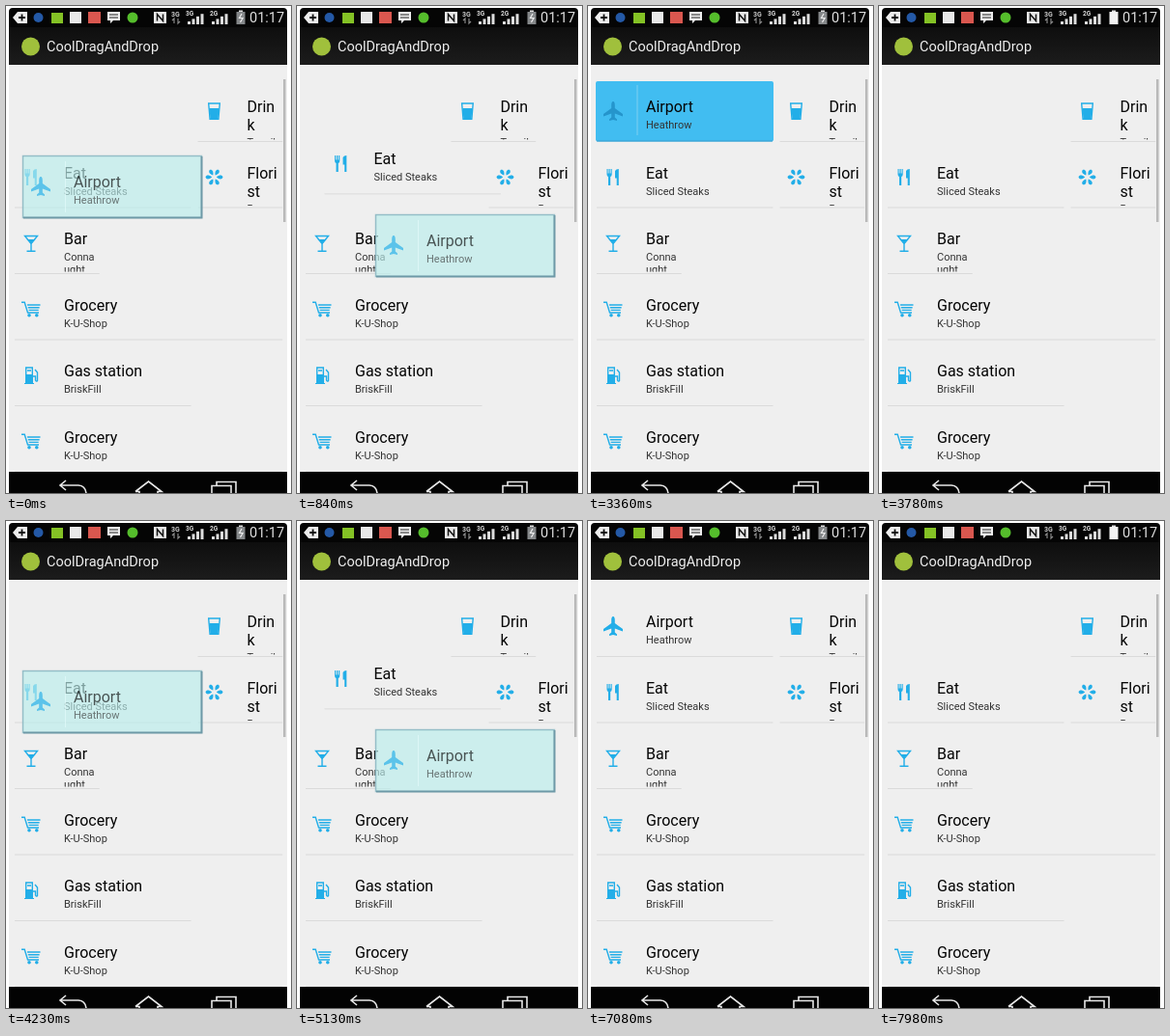
These frames come from a looping animation (295x505 px, 8000 ms). An HTML page with a canvas:

```html
<!DOCTYPE html>
<html lang="en">
<head>
<meta charset="utf-8">
<style>
  html, body { margin: 0; width: 100%; height: 100%; overflow: hidden; background: #fff; }
  canvas { display: block; }
</style>
</head>
<body>
<canvas width="295" height="505"></canvas>
<script>
const ctx = document.querySelector('canvas').getContext('2d');
const LOOP = 8000, TAKE = 4260, TAKE_START = 1470, STEP = 90;
const BLUE = '#22aee8', ROW = 68.5, COL = 94.75;

// Icons are centred on 0,0; "line" parts are stroked, the rest filled.
const icons = {
  plane: { fill: 'M0-10C1.4-10 1.8-8 1.8-6V-3L10 3V5.4L1.8 2.6V6.5L4 8.4V10L0 9L-4 10V8.4L-1.8 6.5V2.6L-10 5.4V3L-1.8-3V-6C-1.8-8-1.4-10 0-10Z' },
  fork: { fill: 'M-6.5-8.5H-5.4V-4H-4.5V-8.5H-3.3V-4H-2.4V-8.5H-1.3V-3Q-1.3-1-2.8-.5V8.5H-5V-.5Q-6.5-1-6.5-3ZM2-6.5Q3-8.5 5.8-8.5V8.5H3.7V1H2Z' },
  glass: { fill: 'M-4.5-4H4.5L0 1Z', line: 'M-6.5-7.5H6.5L0 .5ZM0 0V8M-4.5 8.2H4.5' },
  cart: { fill: 'M-3.8 6.3a1.8 1.8 0 1 0 3.6 0a1.8 1.8 0 1 0-3.6 0M4 6.3a1.8 1.8 0 1 0 3.6 0a1.8 1.8 0 1 0-3.6 0', line: 'M-10-7.3H-6.8L-3.5 3.5H8M-4-4.5H9.5M-3.2-1.8H8.6M-2.4 .9H7.7' },
  pump: { fill: 'M-6-1H2V8H3V9H-7V8H-6Z', line: 'M-5.3 0V-8H1.3V0M2 1H4.5V5Q5.3 7 6.5 5.5V-3L4-6M-4-5H0' },
  cup: { fill: 'M-5-3H5L4 8.5H-4Z', line: 'M-5.8-8H5.8L4.4 8.3H-4.4Z' },
  flower: { fill: Array.from({ length: 6 }, (_, i) => {
    const point = (r, turn) => {
      const a = (i + turn) * Math.PI / 3;
      return `${(r * Math.cos(a)).toFixed(2)} ${(r * Math.sin(a)).toFixed(2)}`;
    };
    return `M${point(2.3, 0)}C${point(6, -.42)} ${point(8.5, -.3)} ${point(9, 0)}C${point(8.5, .3)} ${point(6, .42)} ${point(2.3, 0)}Z`;
  }).join('') }
};
for (const icon of Object.values(icons))
  for (const part in icon) icon[part] = new Path2D(icon[part]);

const airport = { icon: 'plane', title: ['Airport'], sub: ['Heathrow'], span: 2 };
const cells = [
  { icon: 'cup', title: ['Drin', 'k'], sub: ['Tequila'], span: 1, at: [2, 0], to: [0, 0] },
  { icon: 'fork', title: ['Eat'], sub: ['Sliced Steaks'], span: 2, at: [0, 1], to: [1, 0] },
  { icon: 'flower', title: ['Flori', 'st'], sub: ['Roses'], span: 1, at: [2, 1] },
  { icon: 'glass', title: ['Bar'], sub: ['Conna', 'ught'], span: 1, at: [0, 2] },
  { icon: 'cart', title: ['Grocery'], sub: ['K-U-Shop'], span: 3, at: [0, 3] },
  { icon: 'pump', title: ['Gas station'], sub: ['BriskFill'], span: 2, at: [0, 4] },
  { icon: 'cart', title: ['Grocery'], sub: ['K-U-Shop'], span: 3, at: [0, 5] }
];

const clamp = v => Math.min(1, Math.max(0, v));
const progress = (p, from, to) => clamp((p - from) / (to - from));
const ease = v => (1 - Math.cos(Math.PI * v)) / 2;
const mix = (a, b, k) => a + (b - a) * k;

function rect(x, y, w, h, color) {
  ctx.fillStyle = color;
  ctx.fillRect(x, y, w, h);
}
function text(str, x, y, size, color, weight = 400) {
  ctx.font = `${weight} ${size}px Roboto, sans-serif`;
  ctx.fillStyle = color;
  ctx.fillText(str, x, y);
}
function stroke(d, color, width) {
  ctx.strokeStyle = color;
  ctx.lineWidth = width;
  ctx.stroke(typeof d === 'string' ? new Path2D(d) : d);
}
function disc(x, y, r, color) {
  ctx.fillStyle = color;
  ctx.beginPath();
  ctx.arc(x, y, r, 0, 7);
  ctx.fill();
}

function drawIcon(name, x, y, color) {
  const { fill, line } = icons[name];
  ctx.save();
  ctx.translate(x, y);
  ctx.fillStyle = color;
  ctx.fill(fill);
  if (line) stroke(line, color, 1.4);
  ctx.restore();
}

function drawContent(cell, x, y, iconColor = BLUE) {
  const w = cell.span * COL - 4;
  ctx.save();
  ctx.beginPath();
  ctx.rect(x, y, w, 60.5);
  ctx.clip();
  drawIcon(cell.icon, x + 18, y + 31, iconColor);
  cell.title.forEach((s, i) => text(s, x + 52, y + 32 + 19 * i, 16, '#050505'));
  const subTop = cell.title.length > 1 ? 67 : 49;
  cell.sub.forEach((s, i) => text(s, x + 52, y + subTop + 13 * i, 11, '#333'));
  ctx.restore();
}

function drawCell(cell, x, y) {
  drawContent(cell, x, y);
  rect(x + 1, y + 62, cell.span * COL - 7, 1, '#dadada');
}

function drawAirport(p) {
  if (p > 2200) return;
  const pressed = p >= 1590;
  ctx.globalAlpha = 1 - progress(p, 1980, 2200);
  if (pressed) {
    ctx.fillStyle = p < 1800 ? '#6ccbf2' : '#41bdf1';
    ctx.beginPath();
    ctx.roundRect(8, 78, 184, 62.5, 2);
    ctx.fill();
    rect(9, 139.5, 182, 1, '#3a9ccb');
    rect(50.5, 82, 1, 52, '#7fd0f2');
    drawContent(airport, 8, 78, '#2595cc');
  } else drawCell(airport, 8, 78);
  ctx.globalAlpha = 1;
}

function drawShadow(p) {
  if (p < 2400) return;
  const lift = ease(progress(p, 2400, 2730)), drag = progress(p, 2850, 3630), rest = progress(p, 3720, 3900);
  const x = Math.round(mix(10, 18, lift) + 64 * drag + 4 * rest);
  const y = Math.round(mix(88, 156, lift) + 61 * drag + 4 * rest);
  ctx.globalAlpha = .66;
  rect(x - 1, y - 1, 186, 65, '#bbefed');
  rect(x + 43, y + 5, 1, 53, '#e4fafa');
  drawContent(airport, x, y);
  ctx.globalAlpha = .8;
  ctx.strokeStyle = '#86b2be';
  ctx.lineWidth = 1.5;
  ctx.strokeRect(x - .5, y - .5, 185, 64);
  stroke(`M${x} ${y + 63.5}H${x + 184.5}V${y}`, '#64909f', 2);
  ctx.globalAlpha = 1;
}

function signal(x, label) {
  text(label, x, 10, 6.5, '#ddd', 700);
  for (let i = 0; i < 4; i++) rect(x + i * 4.5 + 2, 16 - i * 2.6, 3, 3 + i * 2.6, '#ddd');
}

function drawStatusBar(p) {
  ctx.fillStyle = '#050505';
  ctx.beginPath();
  ctx.roundRect(3, 2, 288, 20, [4, 4, 0, 0]);
  ctx.fill();
  ctx.fillStyle = '#eee';
  ctx.fill(new Path2D('M7 12L12 6H22V18H12Z'));
  stroke('M16.5 8.5V15.5M13 12H20', '#111', 1.8);
  disc(33.5, 12, 5, '#2459a6');
  rect(47, 7, 12, 11, '#84c225');
  rect(66, 6, 12, 12, '#e8e8e8');
  rect(85, 6, 13, 12, '#d9574f');
  ctx.fillStyle = '#eee';
  ctx.fill(new Path2D('M105 6H118V15H111L108 18V15H105Z'));
  stroke('M107 9H116M107 12H116', '#222', 1);
  disc(131, 12, 5.5, '#55bd2c');
  rect(153, 6, 13, 12, '#e8e8e8');
  stroke('M156.5 15.5V8.5L162.5 15.5V8.5', '#111', 1.5);
  text('3G', 171, 11, 7, '#ccc', 700);
  stroke('M174 18V13L172 15M178 13V18L180 16', '#888', 1.2);
  signal(186, '3G');
  signal(211, '2G');
  const full = p < 1170 || (p > 2070 && p < 2700);
  rect(241, 4.5, 4, 2, '#ddd');
  rect(238.5, 6, 9, 13, full ? '#f2f2f2' : '#85888a');
  if (!full) stroke('M244 8L241.5 12.5H245L242.5 17', '#eee', 1.2);
  text('01:17', 252, 17, 14.5, '#dedede');
}

function drawHeader() {
  const shade = ctx.createLinearGradient(0, 22, 0, 61);
  shade.addColorStop(0, '#0e0e0e');
  shade.addColorStop(1, '#1c1c1c');
  rect(3, 22, 288, 39, shade);
  disc(25.5, 42, 9.5, '#a0c03c');
  text('CoolDragAndDrop', 42, 47, 14.5, '#eee');
}

function drawNavBar() {
  rect(3, 483, 288, 22, '#030303');
  stroke('M62 492L56 497L62 502M57 497H75Q82 497.5 83 505', '#e8e8e8', 1.6);
  stroke('M134 503.5L147.5 493L161 503.5H157V506M138 506V503.5H134', '#e8e8e8', 1.6);
  stroke('M213 506V497.5H233V506M218 497V493.5H238V506', '#e8e8e8', 1.6);
}

function draw(t) {
  const p = (t - TAKE_START + TAKE) % TAKE;
  const sampled = Math.floor((p - 30) / STEP) * STEP + 30;
  rect(0, 0, 295, 505, '#fff');
  rect(3, 61, 288, 422, '#efefef');

  const shift = ease(progress(sampled, 3540, 3840));
  ctx.save();
  ctx.beginPath();
  ctx.rect(3, 61, 288, 422);
  ctx.clip();
  for (const cell of cells) {
    const [col, row] = cell.at, [toCol, toRow] = cell.to || cell.at;
    drawCell(cell, 8 + COL * mix(col, toCol, shift), 78 + ROW * mix(row, toRow, shift));
  }
  drawAirport(p);
  if (p < 615) rect(3, 73, 288, 1, '#bdbdbd');
  rect(287, 76, 2.5, 148, '#b9b9b9');
  drawShadow(sampled);
  ctx.restore();

  drawStatusBar(p);
  drawHeader();
  drawNavBar();
}

const start = performance.now();
function tick() {
  draw((performance.now() - start) % LOOP);
  requestAnimationFrame(tick);
}
tick();
</script>
</body>
</html>
```
